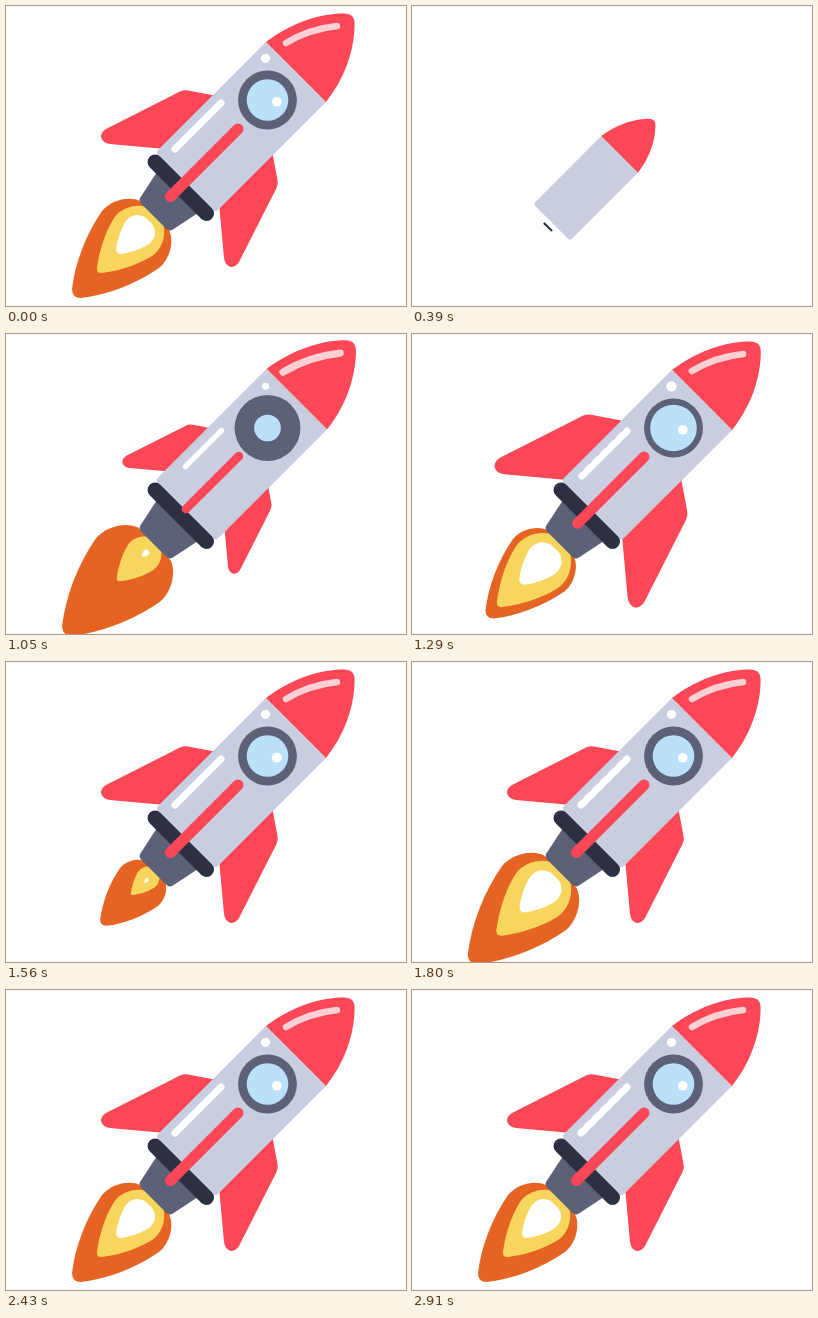
Animation of 400 by 300 pixels, one loop 2940 ms. Source, as an HTML page:

```html
<!DOCTYPE html>
<html lang="en">
<head>
<meta charset="utf-8">
<title>Rocket</title>
<style>
  html, body { margin: 0; width: 100%; height: 100%; overflow: hidden; background: #fff; }
  svg { display: block; width: 100%; height: 100%; }
  .red { fill: #fb4756; }
  .steel { fill: #5d6178; }
  .line { fill: none; stroke-linecap: round; }
  circle { transform-box: fill-box; transform-origin: center; }
  .fin { transform-origin: 207px 117px; }
  .flame { transform-origin: 150px 208px; }
  #core { transform-origin: 142px 217px; }
  #nozzle { transform-origin: 182px 176px; }
  #hull { transform-origin: 178px 178px; }
  #ring { transform-origin: 175px 182px; }
  #shine { transform-origin: 305px 27px; }
  #gloss { transform-origin: 217px 95px; }
  #stripe { transform-origin: 236px 119px; }
</style>
</head>
<body>
<!-- data-at: start of growth, data-ms: its length, data-back: overshoot, data-again: second start -->
<svg viewBox="0 0 400 300">
  <g id="rocket">
    <g class="fin" data-at="910"><path id="fin" class="red" d="M222,92 L182,84.5 Q178,83.5 174,85.5 L100,123 Q94,127 95.3,132 Q97,137 104,138 L170,144Z"/></g>
    <g transform="matrix(0 -1 -1 0 356 356)"><g class="fin" data-at="910"><use href="#fin"/></g></g>
    <path class="flame" data-at="735" data-again="1455" fill="#e66423" d="M134,195 C124,190 106,193 96,205 C80,228 69,257 66,283 Q66,292 75,292 C101,289 130,278 153,262 C165,252 168,234 163,224Z"/>
    <path class="flame" data-at="945" data-again="1500" fill="#f8d65d" d="M145,203 C136,197 117,199 108,212 C98,228 93,247 91,262 Q90.5,267.5 96,267 C111,265 130,260 146,250 C159,241 161,222 155,213Z"/>
    <path id="core" data-at="1025" data-again="1545" fill="#fff" d="M143,215 C136,206 124,207 118,218 C113,228 111,236 110,243 Q110,248 115,248 C122,247 130,245 140,240 C151,234 152,222 143,215Z"/>
    <path id="nozzle" class="steel" data-at="435" data-back="2.3" d="M155,160 L134.3,191.5 Q132.5,195 135.5,198 L160,222.5 Q163,225.5 166.5,223.7 L198,203Z"/>
    <g id="hull" data-at="100" data-ms="1260" data-back=".5">
      <path fill="#c9cde0" d="M260,36 L320,96 L212.5,203.5 Q209,207 205.5,203.5 L152.5,150.5 Q149,147 152.5,143.5Z"/>
      <path class="red" d="M260,36 C290,13.5 320,7.5 338,7.6 Q348.6,7.6 348.6,18 C348.6,37 343,67 320,96Z"/>
    </g>
    <path id="ring" class="line" data-at="360" data-ms="620" data-back="0" stroke="#2d2f43" stroke-width="15" d="M149,156 L200.5,207.5"/>
    <path id="shine" class="line" data-at="714" stroke="#fdd0d4" stroke-width="6.5" d="M280,37 Q303,23 331,20"/>
    <circle data-at="920" fill="#fff" cx="259.5" cy="52.3" r="4.6"/>
    <circle data-at="714" class="steel" cx="261.5" cy="94" r="29.4"/>
    <circle data-at="950" fill="#bae1f9" cx="261.5" cy="94" r="20.8"/>
    <circle data-at="1080" fill="#fff" cx="270.8" cy="95.8" r="4.8"/>
    <path id="gloss" class="line" data-at="770" data-ms="700" data-back="0" stroke="#fff" stroke-width="7" d="M215,97 L169,143"/>
    <path id="stripe" class="line" data-at="770" data-ms="700" data-back="0" stroke="#fb4756" stroke-width="11" d="M232,123 L164.5,190.5"/>
  </g>
</svg>
<script>
const LOOP = 2940, STEP = 30, FADE = 240;

const progress = (t, from, ms) => Math.min(1, Math.max(0, (t - from) / ms));

// Ease out, running past 1 when back > 0
function grow(t, from, ms, back) {
  const v = progress(t, from, ms) - 1;
  return 1 + (back + 1) * v ** 3 + back * v ** 2;
}

const rocket = document.getElementById("rocket");
const parts = [...document.querySelectorAll("[data-at]")].map(node => {
  const { at, ms = 600, back = 1.9, again = Infinity } = node.dataset;
  return { node, at: +at, ms: +ms, back: +back, again: +again };
});

function size({ at, ms, back, again }, t) {
  if (t >= again) return grow(t, again, ms, back);
  const dying = again < Infinity ? progress(t, again - FADE, FADE) : 0;
  return grow(t, at, ms, back) * (1 - dying ** 2);
}

function draw(t) {
  const whole = t < STEP;
  const away = whole ? 0 : 41 * (1 + Math.cos(Math.PI * progress(t, 60, 640)));
  rocket.setAttribute("transform", `translate(${-away} ${away})`);
  for (const part of parts) {
    const s = whole ? 1 : size(part, t);
    part.node.style.visibility = s > .002 ? "visible" : "hidden";
    part.node.style.transform = `scale(${s})`;
  }
}

const start = performance.now();
function tick() {
  const t = (performance.now() - start) % LOOP;
  draw(Math.floor(t / STEP) * STEP);
  requestAnimationFrame(tick);
}
tick();
</script>
</body>
</html>
```
